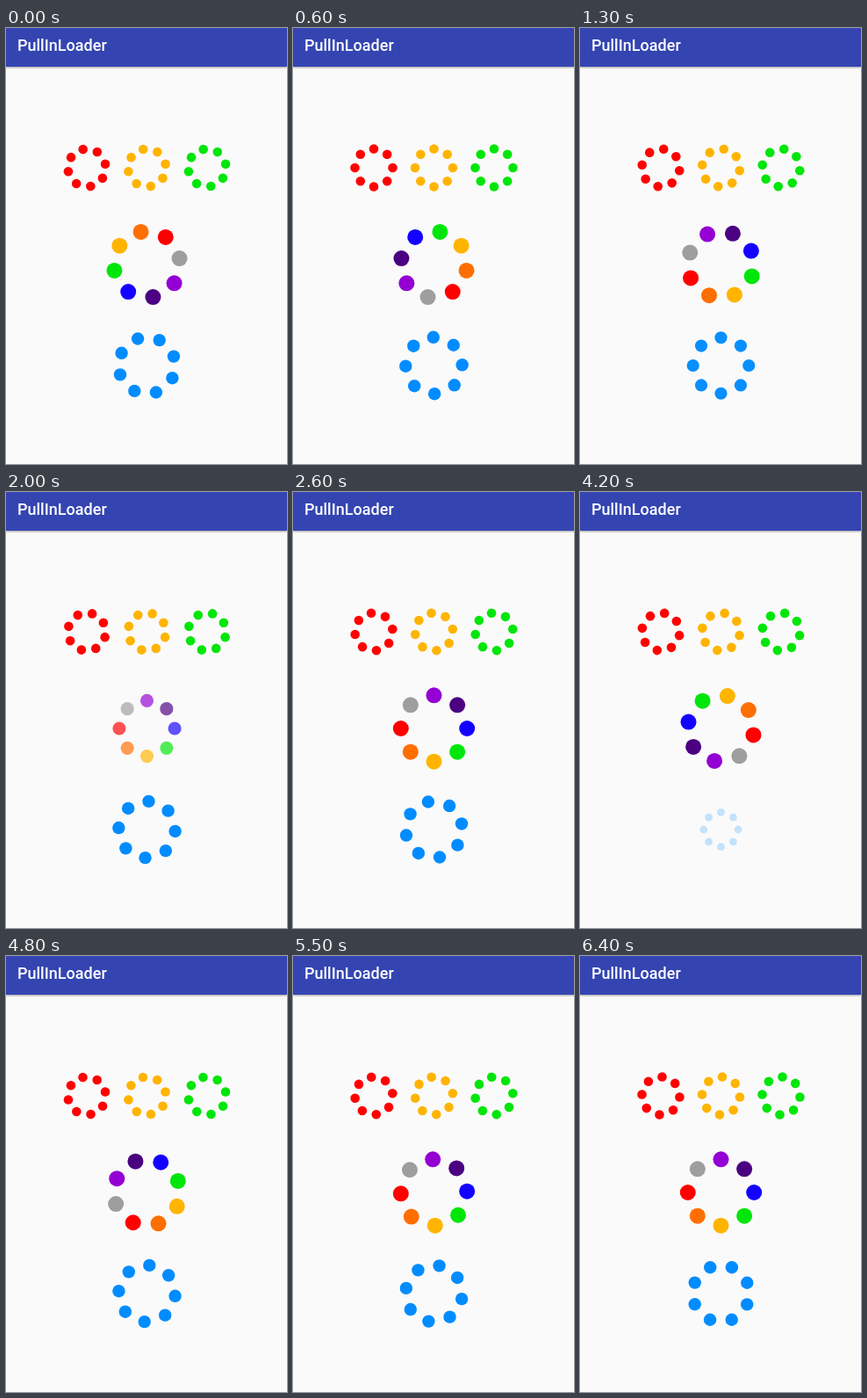
Recreate the animation shown at these times as an HTML page with a canvas. Size 320 px wide and 496 px high, loop 6.5 s.

```html
<!DOCTYPE html>
<html lang="en">
<head>
<meta charset="utf-8">
<title>PullInLoader</title>
<style>
  html, body { margin: 0; width: 100%; height: 100%; overflow: hidden; background: #fafafa; }
  header {
    position: absolute; top: 0; left: 0; width: 320px; height: 44px;
    background: #3445b1; box-shadow: 0 1px 2px rgba(0, 0, 0, .4);
    color: #fff; font: 500 18px/40px Roboto, sans-serif; text-indent: 13px;
  }
  canvas { position: absolute; top: 0; left: 0; }
</style>
</head>
<body>
<header>PullInLoader</header>
<canvas id="stage" width="320" height="496"></canvas>
<script>
const LOOP = 6500;
const STEP = 100;
const HOLD = 95; // rest before and after each pull, in ms
const ctx = document.getElementById('stage').getContext('2d');

const small = { y: 159, ring: 21.5, dot: 5.3, spin: 2000, pause: 582, offset: 1481 };
const loaders = [
  { ...small, x: 92, colors: ['#ff0000'] },
  { ...small, x: 160.5, colors: ['#ffb400'] },
  { ...small, x: 229, colors: ['#00e60a'] },
  { x: 160.5, y: 269, ring: 37.7, dot: 9, spin: 3000, pause: 840, offset: 1200,
    colors: ['#9400d3', '#4b0082', '#1400ff', '#00e60a', '#ffb400', '#ff6e00', '#ff0000', '#9e9e9e'] },
  { x: 160.5, y: 384, ring: 32.2, dot: 7.2, spin: 2500, pause: 710, offset: 1808, colors: ['#008cff'] }
];

// One eased turn, then a linear pull towards the centre and back (0 to 1 to 0).
function poseAt(loader, time) {
  const { spin, pause, offset } = loader;
  const t = (time + offset) % (spin + pause);
  if (t < spin) return { angle: Math.PI * (1 - Math.cos(Math.PI * t / spin)), pull: 0 };
  const edge = Math.min(t - spin, spin + pause - t);
  return { angle: 0, pull: Math.max(0, (edge - HOLD) / (pause / 2 - HOLD)) };
}

function drawLoader(loader, time) {
  const { x, y, ring, dot, colors } = loader;
  const { angle, pull } = poseAt(loader, time);
  const scale = 1 - pull / 2;
  ctx.globalAlpha = 1 - pull;
  for (let i = 0; i < 8; i++) {
    const a = angle + i * Math.PI / 4;
    ctx.fillStyle = colors[i % colors.length];
    ctx.beginPath();
    ctx.arc(x + ring * scale * Math.sin(a), y - ring * scale * Math.cos(a), dot * scale, 0, 2 * Math.PI);
    ctx.fill();
  }
}

function render() {
  const time = Math.floor(performance.now() % LOOP / STEP) * STEP;
  ctx.clearRect(0, 0, 320, 496);
  loaders.forEach(loader => drawLoader(loader, time));
  requestAnimationFrame(render);
}
render();
</script>
</body>
</html>
```
